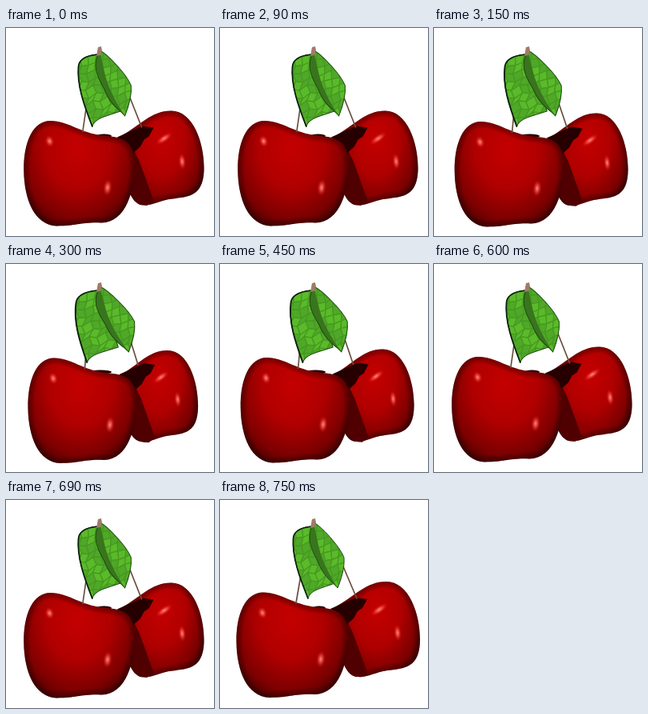
An HTML page with a canvas for the animation above (0.9 s loop, 260 by 260 pixels).

```html
<!DOCTYPE html>
<html lang="en">
<head>
<meta charset="utf-8">
<title>Swinging cherries</title>
<style>
html, body { margin: 0; width: 100%; height: 100%; overflow: hidden; background: #fff; }
canvas { display: block; width: 260px; height: 260px; }
</style>
</head>
<body>
<canvas id="stage" width="260" height="260"></canvas>
<script>
const ctx = document.getElementById('stage').getContext('2d');
const STEP_MS = 150, STEPS = 6;

// Outlines at the outermost point of the swing.
const leftCherry = new Path2D(`M20.5 178 C20 142 32 115.5 54 115.5 C76 115.5 92 131 120 134
  C146 136 160 140 160.5 172 C160 200 150 243 118 243 C92 242 88 247 62 247 C34 246 21 214 20.5 178Z`);
const rightCherry = new Path2D(`M142 135 C168 121 182 102 208 102 C236 102 250 142 250 174
  C250 214 226 210 204 214 C188 218 182 222 172 221 C150 220 146 170 142 135Z`);
const cavity = new Path2D('M138 136 L170 122 L184 124 L178 135 L172 139 L167 148 L157 157Z');
const shade = new Path2D('M145 150 L159 152 L166 166 L184 215 L170 226 L148 226Z');
const leafEdge = 'M118 33 C104 33 92 38 91.5 48 C90 72 100 98 110 123';
const leftLeaf = new Path2D(leafEdge + ' C113 113 124 111 144 104 L118 33Z');
const rib = 'M117 28 C108 46 112 58 122 76 C130 98 142 103 147 110';
const rightLeaf = new Path2D(rib + ' C151 100 156 86 155 72 C150 58 126 32 117 28Z');
const fold = new Path2D(rib + ' C136 92 126 74 122 52Z');

const mix = (a, b, t) => a + (b - a) * t;

function fill(path, color) {
  ctx.fillStyle = color;
  ctx.fill(path);
}

function stroke(path, color, width) {
  ctx.strokeStyle = color;
  ctx.lineWidth = width;
  ctx.stroke(path);
}

// Draws with a stretch about (x, y), a horizontal shear and a shift.
function swing({ x = 0, y = 0, sx = 1, sy = 1, shear = 0, dx = 0, dy = 0 }, paint) {
  ctx.save();
  ctx.translate(x + dx, y + dy);
  ctx.transform(sx, 0, shear, sy, 0, 0);
  ctx.translate(-x, -y);
  paint();
  ctx.restore();
}

function radial(x, y, rx, ry, angle, stops) {
  ctx.save();
  ctx.translate(x, y);
  ctx.rotate(angle);
  ctx.scale(rx, ry);
  const gradient = ctx.createRadialGradient(0, 0, 0, 0, 0, 1);
  stops.forEach(([offset, color]) => gradient.addColorStop(offset, color));
  ctx.fillStyle = gradient;
  ctx.fillRect(-2, -2, 4, 4);
  ctx.restore();
}

function shine(x, y, rx, ry, angle = 0) {
  radial(x, y, rx, ry, angle,
    [[0, 'rgba(255,150,140,.95)'], [0.4, 'rgba(255,100,90,.6)'], [1, 'rgba(220,0,0,0)']]);
}

function cherry(outline, x, y, rx, ry, details) {
  ctx.save();
  ctx.clip(outline);
  radial(x, y, rx, ry, 0,
    [[0, '#c40000'], [0.45, '#b00000'], [0.8, '#7c0000'], [1, '#400000']]);
  for (let width = 3; width < 16; width += 4) stroke(outline, 'rgba(30,0,0,.12)', width);
  details();
  ctx.restore();
}

// Irregular patches, repeatable for every leaf.
function leafCells() {
  const jitter = (i, j) => Math.sin(i * 12.9 + j * 78.2) * 2.2;
  const corner = (i, j) => [85 + i * 9 + jitter(i, j), 22 + j * 10 - i * 3 + jitter(j, i)];
  for (let i = 0; i < 9; i++) {
    for (let j = 0; j < 14; j++) {
      const cell = new Path2D();
      [[0, 0], [1, 0], [1, 1], [0, 1]].forEach(([a, b]) => cell.lineTo(...corner(i + a, j + b)));
      cell.closePath();
      fill(cell, (i * 3 + j * 5) % 4 < 2 ? '#5aba2a' : '#4fa828');
      stroke(cell, '#46981f', 1.2);
    }
  }
}

function leafHalf(outline, details = () => {}) {
  ctx.save();
  ctx.clip(outline);
  leafCells();
  details();
  ctx.restore();
  stroke(outline, '#1d4d10', 1);
}

function stem(x1, y1, x2, y2) {
  const path = new Path2D();
  path.moveTo(x1, y1);
  path.lineTo(x2, y2);
  stroke(path, '#6b4f3e', 1.7);
}

// k runs from 0 (cherries apart) to 1 (cherries together).
function draw(k) {
  ctx.fillStyle = '#fff';
  ctx.fillRect(0, 0, 260, 260);
  ctx.lineCap = ctx.lineJoin = 'round';
  const leftSwing = { x: 20, sx: 1 - 0.029 * k, dx: 7 * k, dy: 2 * k };

  swing({ x: 140, y: 100, sx: 1 - 0.09 * k, sy: 1 - 0.04 * k, dy: 6 * k }, () =>
    cherry(rightCherry, 196, 138, 66, 100, () => {
      shine(199, 137, 13, 5, -0.6);
      shine(222, 166, 5, 11, -0.1);
    }));
  swing(leftSwing, () => {
    ctx.save();
    ctx.clip(rightCherry);
    fill(shade, '#500000');
    ctx.restore();
    fill(cavity, '#260000');
  });

  const dimple = new Path2D();
  dimple.ellipse(mix(124, 118, k), 135, mix(8, 14, k), 2.5, 0, 0, Math.PI * 2);
  fill(dimple, '#260000');
  swing(leftSwing, () =>
    cherry(leftCherry, 88, 150, 90, 110, () => {
      shine(53, 141, 6, 8, -0.3);
      shine(126, 199, 6, 11, 0.1);
    }));

  stem(mix(106, 103, k), 65, mix(95, 98.5, k), mix(129, 131, k));
  stem(mix(142, 143, k), 55, mix(171, 165, k), mix(123, 126, k));

  swing({ x: 117, y: 33, sx: 1 + 0.1 * k, shear: -0.09 * k }, () => {
    leafHalf(leftLeaf);
    stroke(new Path2D(leafEdge), '#0a200a', 1.7);
  });
  swing({ x: 117, y: 28, sx: 1 + 0.1 * k, shear: 0.04 * k }, () =>
    leafHalf(rightLeaf, () => fill(fold, '#38751d')));

  fill(new Path2D('M115 24 L119 23 L120 28 L118 34 L113 35Z'), '#a17b68');
}

function tick() {
  const step = Math.floor(performance.now() / STEP_MS) % STEPS;
  draw((1 - Math.cos((step + 1) * 2 * Math.PI / STEPS)) / 2);
  requestAnimationFrame(tick);
}
tick();
</script>
</body>
</html>
```
